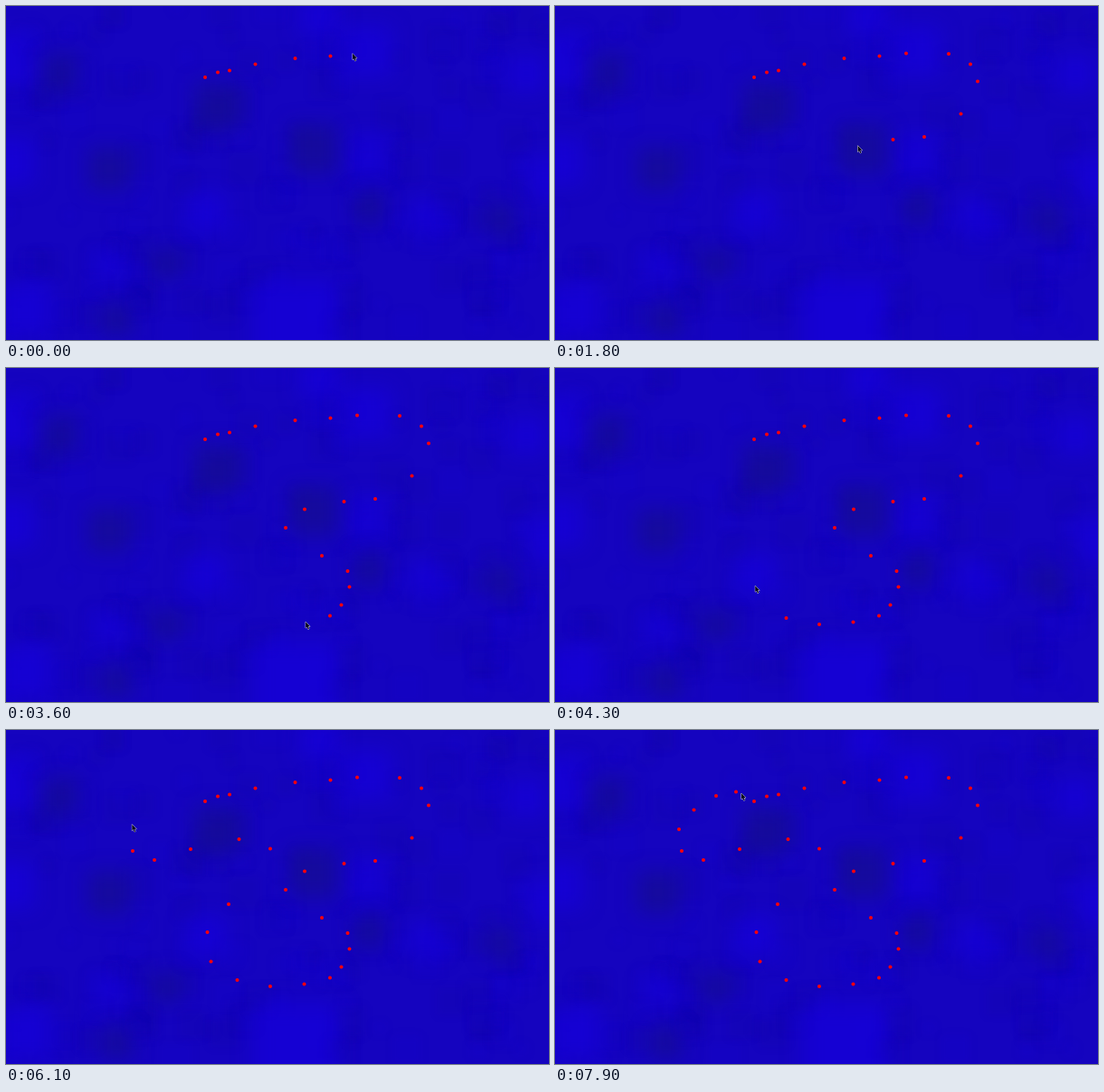
Animation, 600 px wide and 370 px high, one loop 8000 ms. Source, as an HTML page with a canvas:

```html
<!DOCTYPE html>
<html lang="en">
<head>
<meta charset="utf-8">
<title>Plotting a closed curve</title>
<style>
html, body { margin: 0; width: 100%; height: 100%; overflow: hidden; background: #1406bb; }
canvas { display: block; }
</style>
</head>
<body>
<canvas id="stage" width="600" height="370"></canvas>
<script>
const W = 600, H = 370, LOOP = 8000, STEP = 100, LAG = 180;
const ctx = document.getElementById('stage').getContext('2d');

// Points of the curve in click order; the last one is where the pointer rests
const points = [
  [220, 79], [234, 73.5], [247, 71.5], [275.5, 64.5], [319.5, 58], [358.5, 55.5], [388, 52.5],
  [435, 53], [459, 64.5], [467, 83.5], [448.5, 119.5], [408, 145], [373.5, 148], [330, 156.5],
  [309, 177], [349, 208], [377.5, 225], [379.5, 242.5], [370.5, 262.5], [358, 274.5],
  [329.5, 281.5], [292, 284], [255.5, 277], [226.5, 256.5], [222.5, 224], [246, 193],
  [292, 131.5], [257.5, 121], [204, 132], [164, 144], [140, 134], [137, 110],
  [153.5, 88.5], [178, 73], [200, 68.5], [206, 70]
];
const last = points.length - 1;

// Pointer progress along the points, sampled every BEAT ms
const BEAT = 900;
const pace = [5.86, 9.65, 12.87, 15.95, 19.95, 24.5, 27.5, 32.3, last];

function progress(t) {
  const b = Math.max(t, 0) / BEAT, i = Math.floor(b);
  if (i >= pace.length - 1) return last;
  return pace[i] + (pace[i + 1] - pace[i]) * (b - i);
}

// Catmull-Rom spline through the points
function along(s) {
  const i = Math.min(Math.floor(s), last - 1), u = s - i;
  const [a, b, c, d] = [-1, 0, 1, 2].map(n => points[Math.min(Math.max(i + n, 0), last)]);
  return [0, 1].map(k => b[k] + u / 2 * (c[k] - a[k] +
    u * (2 * a[k] - 5 * b[k] + 4 * c[k] - d[k] + u * (3 * (b[k] - c[k]) + d[k] - a[k]))));
}

function randomizer(seed) {
  return () => (seed = seed * 16807 % 2147483647) / 2147483647;
}

// Main soft patches: centre x, centre y, size
const light = [
  [346, 12, 44], [398, 50, 56], [0, 60, 60], [5, 172, 52], [222, 228, 44], [115, 289, 30],
  [400, 165, 46], [464, 232, 38], [320, 350, 96], [598, 190, 50], [20, 335, 60], [575, 75, 40]
];
const dark = [
  [340, 158, 54], [114, 180, 46], [234, 111, 52], [62, 74, 40],
  [177, 285, 32], [122, 347, 34], [401, 221, 32], [545, 235, 32]
];

function makeBackdrop() {
  const c = document.createElement('canvas');
  c.width = W;
  c.height = H;
  const g = c.getContext('2d'), rnd = randomizer(7);
  g.fillStyle = '#1504bf';
  g.fillRect(0, 0, W, H);

  const patch = (x, y, size, color) => {
    g.fillStyle = color;
    g.fillRect(x - size / 2, y - size / 2, size, size);
  };
  g.filter = 'blur(4px)';
  for (let i = 0; i < 160; i++) {
    patch(rnd() * W, rnd() * H, 12 + rnd() * 24, i % 2 ? 'rgba(22,0,220,.12)' : 'rgba(22,14,145,.12)');
  }
  g.filter = 'blur(11px)';
  for (const p of light) patch(...p, 'rgba(22,0,222,.65)');
  for (const p of dark) patch(...p, 'rgba(22,14,140,.65)');
  return c;
}

const backdrop = makeBackdrop();

function drawDot([x, y]) {
  ctx.fillStyle = '#ff0008';
  ctx.beginPath();
  ctx.arc(x, y, 2, 0, Math.PI * 2);
  ctx.fill();
}

const arrow = new Path2D('M0 0V6.8L1.5 5.4L2.6 8.2L3.8 7.7L2.7 5H4.8Z');

function drawArrow([x, y]) {
  ctx.save();
  ctx.translate(x, y);
  ctx.lineJoin = 'round';
  ctx.strokeStyle = '#d0d0dc';
  ctx.stroke(arrow);
  ctx.fillStyle = '#08061c';
  ctx.fill(arrow);
  ctx.restore();
}

function draw(now) {
  const t = Math.floor((now % LOOP) / STEP) * STEP;
  const done = Math.min(progress(t - LAG), last - 1);
  ctx.drawImage(backdrop, 0, 0);
  for (let i = 0; i <= done; i++) drawDot(points[i]);
  drawArrow(along(progress(t)));
}

const start = performance.now();
function tick() {
  draw(performance.now() - start);
  requestAnimationFrame(tick);
}
tick();
</script>
</body>
</html>
```
